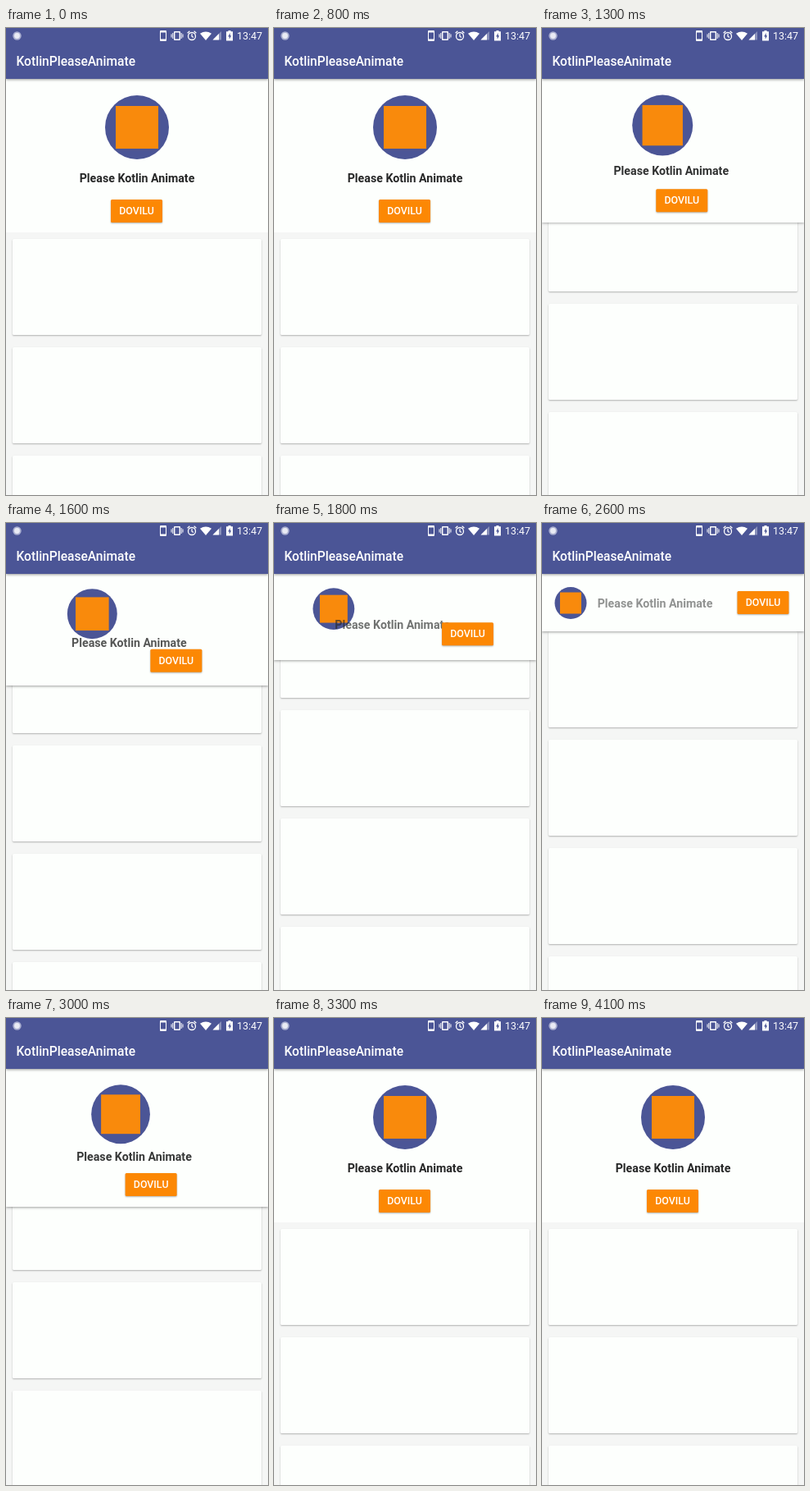
These frames come from a looping animation (320x569 px, 4200 ms). An HTML page:

```html
<!DOCTYPE html>
<html lang="en">
<head>
<meta charset="utf-8">
<title>KotlinPleaseAnimate</title>
<style>
html, body { margin: 0; width: 100%; height: 100%; overflow: hidden; background: #f5f6f5; }
body { position: relative; font-family: Roboto, sans-serif; }
div, svg { position: absolute; white-space: nowrap; }
#list { left: 8px; top: 257px; width: 304px; }
.card { width: 100%; height: 117px; border-radius: 1.5px; background: #fdfffd; box-shadow: 0 1px 2px rgba(0,0,0,.28); }
#head { left: 0; top: 0; width: 320px; background: #fdfffd; }
#disc { left: 121px; top: 82px; width: 78px; height: 78px; border-radius: 50%; background: #4b5596; }
#mark { inset: 13px; background: #f98a0c; }
#name { left: 60px; top: 173px; width: 200px; text-align: center; font: 700 14.2px/20px Roboto, sans-serif; color: #262727; }
#button { left: 128px; top: 209px; width: 63px; height: 28px; border-radius: 1.5px; background: #fc8804; color: #fff;
  text-align: center; font: 500 12.4px/28.5px Roboto, sans-serif; box-shadow: 0 1px 2px rgba(0,0,0,.3); }
#bar { left: 0; top: 0; width: 320px; height: 62px; background: #4b5596; color: #fff; box-shadow: 0 1px 3px rgba(0,0,0,.4); }
#title { left: 12.5px; top: 31px; font: 500 15.57px/20px Roboto, sans-serif; }
#clock { left: 282px; top: 0; font: 400 12.45px/19px Roboto, sans-serif; }
</style>
</head>
<body>
<div id="list"></div>
<div id="head">
  <div id="disc"><div id="mark"></div></div>
  <div id="name">Please Kotlin Animate</div>
  <div id="button">DOVILU</div>
</div>
<div id="bar">
  <svg width="320" height="20" fill="#fff" stroke="none">
    <circle cx="13.5" cy="9.5" r="5.2" fill="#a9aed0"/>
    <circle cx="13.5" cy="9.5" r="3.4" fill="#e9ebf4"/>
    <path fill-rule="evenodd" d="M189 3h6q1 0 1 1v11q0 1-1 1h-6q-1 0-1-1V4q0-1 1-1zM189 5.5v8h6v-8z"/>
    <path fill-rule="evenodd" d="M206 4h6q1 0 1 1v9q0 1-1 1h-6q-1 0-1-1V5q0-1 1-1zM206.4 5.6v7.8h5.2V5.6z"/>
    <path d="M203.8 6v7M214.2 6v7M202 7.5v4M216 7.5v4" stroke="#fff" stroke-width="1"/>
    <g fill="none" stroke="#fff" stroke-width="1.3">
      <circle cx="227" cy="10" r="4.5"/>
      <path d="M227 7.2v3l2 1.3M221.6 6.2l2.8-2.4M232.4 6.2l-2.8-2.4"/>
    </g>
    <path d="M237 6.8Q244 2 251 6.8L244 15z"/>
    <path d="M263 4v10.500h-10.500z" opacity=".35"/>
    <path d="M260 7v7.500h-7.500z"/>
    <path d="M271.500 4.200V3h3v1.200h2.500v11.300h-8V4.200z"/>
    <path d="M273.700 6l-2.500 4.500h1.500v3.300l2.500-4.500h-1.500z" fill="#4b5596"/>
  </svg>
  <div id="clock">13:47</div>
  <div id="title">KotlinPleaseAnimate</div>
</div>
<script>
const LOOP = 4200, STEP = 100, REACH = 256;
// [time in ms, scroll offset in px]
const drag = [[0, 0], [900, 0], [1000, 4], [1300, 53], [1800, 161], [2100, 243], [2200, 253], [2400, 258],
  [2500, 258], [2600, 257], [2700, 226], [2800, 178], [3000, 67], [3100, 0], [LOOP, 0]];
const el = id => document.getElementById(id);
const [list, head, disc, label, button] = ['list', 'head', 'disc', 'name', 'button'].map(el);

for (let i = 0; i < 6; i++) {
  const card = document.createElement('div');
  card.className = 'card';
  card.style.top = i * 132 + 'px';
  list.append(card);
}

function scrollAt(t) {
  const i = drag.findIndex(k => k[0] > t);
  const [t0, s0] = drag[i - 1], [t1, s1] = drag[i];
  return s0 + (s1 - s0) * (t - t0) / (t1 - t0);
}

const move = (node, x, y, scale = 1) => {
  node.style.transform = `translate(${x}px, ${y}px) scale(${scale})`;
};

function draw(now) {
  // the screen refreshes ten times a second
  const t = Math.floor((now + 16) % LOOP / STEP) * STEP;
  const s = scrollAt(t);
  const p = (1 - Math.cos(Math.PI * Math.min(1, s / REACH))) / 2;
  move(list, 0, -Math.round(s));
  head.style.height = Math.round(249 - 117 * p) + 'px';
  head.style.boxShadow = `0 1px 3px rgba(0,0,0,${0.38 * Math.min(1, p * 8)})`;
  move(disc, -125 * p, -23.5 * p, 1 - p / 2);
  move(label, -22 * p, -85 * p);
  label.style.opacity = 1 - p / 2;
  move(button, 110.5 * p, -126 * p);
}

const start = performance.now();
function tick() {
  draw(performance.now() - start);
  requestAnimationFrame(tick);
}
tick();
</script>
</body>
</html>
```
